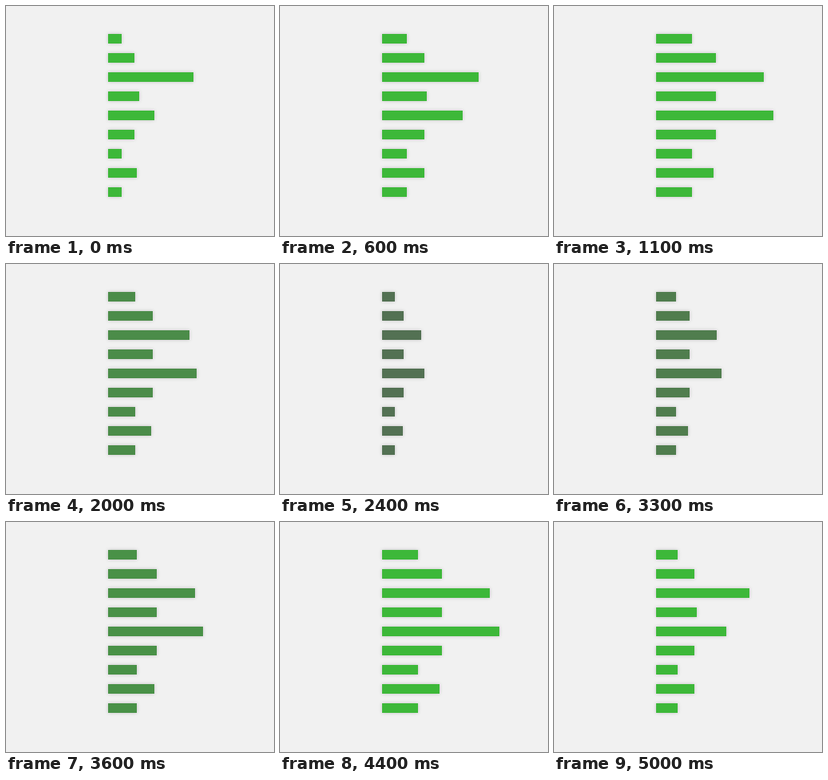
An HTML page that plays this animation: 336x288 px, repeating every 5100 ms.

```html
<!DOCTYPE html>
<html lang="en">
<head>
<meta charset="utf-8">
<title>Pulsing bars</title>
<style>
  html, body { margin: 0; width: 100%; height: 100%; overflow: hidden; background: #f1f1f1; }
  svg { display: block; width: 336px; height: 288px; }
  #bars { filter: drop-shadow(0 0 2px rgba(0, 0, 0, .2)); }
</style>
</head>
<body>
<svg viewBox="0 0 336 288"><g id="bars"></g></svg>
<script>
const LOOP = 5100, STEP = 100, UNIT = 3;
const low = [5, 10, 35, 12, 17, 10, 5, 11, 5];
const high = [15, 25, 45, 25, 49, 25, 15, 24, 15];
const bright = [61, 184, 57], dull = [89, 95, 89];

// every move takes equally long; these are the starting times
const MOVE = 1320;
const GROW = -350, COLLAPSE = 1344, RISE = 2855, SHRINK = 4504;

const mix = (a, b, k) => a + (b - a) * k;
const progress = (t, begin) => Math.min(1, Math.max(0, (t - begin) / MOVE));
const easeIn = u => u * u;
const easeOut = u => 1 - easeIn(1 - u);

const group = document.getElementById("bars");
const bars = low.map((_, i) => {
  const bar = document.createElementNS("http://www.w3.org/2000/svg", "rect");
  bar.setAttribute("x", 128);
  bar.setAttribute("y", 35 + 24 * i);
  bar.setAttribute("height", 12);
  return group.appendChild(bar);
});

function draw(ms) {
  const t = Math.floor(ms % LOOP / STEP) * STEP;
  const down = progress(t, COLLAPSE), up = progress(t, RISE);
  const full = easeIn(progress(t, GROW)) - easeOut(progress(t, SHRINK));
  const scale = 1 - easeIn(down) + easeOut(up);
  const rgb = bright.map((c, i) => Math.round(mix(c, dull[i], down - up)));
  group.setAttribute("fill", `rgb(${rgb})`);
  bars.forEach((bar, i) =>
    bar.setAttribute("width", Math.round(UNIT * mix(low[i], high[i], full) * scale)));
}

let start;
function tick(now) {
  start ??= now;
  draw(Math.max(0, now - start));
  requestAnimationFrame(tick);
}
draw(0);
requestAnimationFrame(tick);
</script>
</body>
</html>
```
